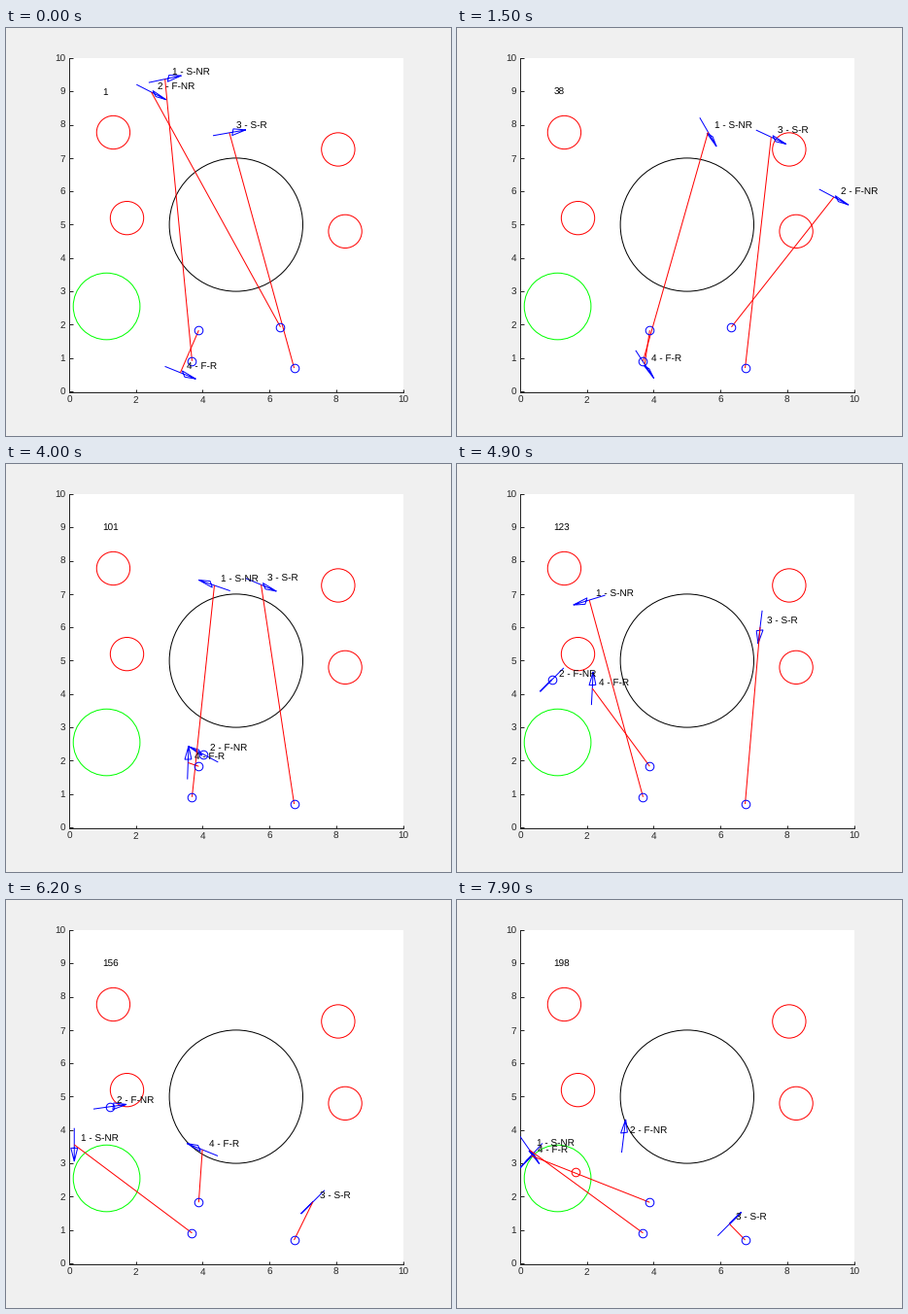
A matplotlib script for the animation above (8 s loop, 458 by 420 pixels).

```python
import numpy as np
import matplotlib.pyplot as plt
from matplotlib.animation import FuncAnimation

W, H, DPI = 458, 420, 100
FRAMES, INTERVAL = 80, 100
PX = 72 / DPI  # one pixel in points
GRAY = "#262626"
SLOW, FAST = 0.28, 0.45  # units per frame
plt.rcParams.update({"font.family": "Liberation Sans", "font.size": 10 * PX,
                     "text.hinting": "none"})

# Key poses (x, y, heading in degrees) that every robot passes at TIMES
TIMES = (0, 15, 27, 40, 49, 62, 79)
ROBOTS = {
    "1 - S-NR": (SLOW, [(2.87, 9.37, 12), (5.63, 7.78, -60), (5.02, 6.65, 175),
                        (4.35, 7.26, 161), (2.07, 6.82, 197),
                        (.15, 3.56, 270), (.28, 3.4, -55)]),
    "2 - F-NR": (FAST, [(2.46, 8.98, -27), (9.4, 5.83, -28), (8.79, 4.4, 225),
                        (4.02, 2.19, 152), (.95, 4.43, 225),
                        (1.22, 4.7, 8), (3.1, 3.82, 83)]),
    "3 - S-R": (SLOW, [(4.8, 7.76, 10), (7.52, 7.63, -25), (7.11, 7.55, 154),
                       (5.75, 7.28, -23), (7.19, 6.01, 263),
                       (7.3, 1.84, 225), (6.27, 1.18, 45)]),
    "4 - F-R": (FAST, [(3.33, .56, -22), (3.73, .81, -57), (4.86, .84, -57),
                       (3.56, 1.94, 88), (2.16, 4.17, 87),
                       (3.99, 3.41, 158), (.33, 3.23, 228)]),
}
ITEMS = [(3.68, .91), (6.33, 1.93), (6.74, .7), (3.88, 1.83)]
CARRIER, PICK, DROP = 1, 34, 71
DROP_POINT = (1.65, 2.74)


def unit(deg):
    a = np.radians(deg)
    return np.array([np.cos(a), np.sin(a)])


def make_path(speed, poses):
    """Join key poses with Hermite curves; spare travel becomes a loop."""
    keys = [(t, np.array(p[:2]), unit(p[2])) for t, p in zip(TIMES, poses)]

    def pose(i):
        k = next(k for k in range(1, len(keys)) if i <= keys[k][0])
        (t0, p, u), (t1, q, v) = keys[k - 1], keys[k]
        s = (i - t0) / (t1 - t0)
        m, n = speed * (t1 - t0) * u, speed * (t1 - t0) * v
        pos = ((2*s**3 - 3*s**2 + 1) * p + (s**3 - 2*s**2 + s) * m
               + (3*s**2 - 2*s**3) * q + (s**3 - s**2) * n)
        vel = (6*s*(s - 1) * (p - q) + (3*s**2 - 4*s + 1) * m
               + (3*s**2 - 2*s) * n)
        return pos, vel / np.hypot(*vel)

    def add(t, point, heading):
        keys.append((t, np.array(point), unit(heading)))
        keys.sort(key=lambda key: key[0])

    pose.add = add
    return pose


def arrow(pos, u):
    """Shaft and head; the head narrows towards the diagonals."""
    tail, tip = pos - u / 2, pos + u / 2
    side = 0.1 * u[::-1]
    base = tip - 0.4 * u
    return np.array([tail, tip, base + side, base - side, tip]).T


fig = plt.figure(figsize=(W / DPI, H / DPI), dpi=DPI, facecolor="#f0f0f0")
ax = fig.add_axes([65.1 / W, 46 / H, 343.4 / W, 343 / H])
ax.set(xlim=(0, 10), ylim=(0, 10), xticks=range(0, 11, 2), yticks=range(11))
ax.spines[["top", "right"]].set_visible(False)
ax.spines[["left", "bottom"]].set(linewidth=PX, color=GRAY)
ax.spines["bottom"].set_position(("outward", 0.7 * PX))
ax.tick_params(direction="in", length=3.5 * PX, width=PX, pad=4 * PX,
               color=GRAY, labelcolor=GRAY)


def ring(x, y, r, color):
    ax.add_patch(plt.Circle((x, y), r, fill=False, ec=color, lw=PX))


ring(5, 5, 2, "black")
ring(1.12, 2.55, 1, "lime")
for x, y in [(1.32, 7.77), (1.73, 5.2), (8.06, 7.26), (8.27, 4.8)]:
    ring(x, y, 0.5, "red")


def line(color, z):
    return ax.plot([], [], color=color, lw=PX, zorder=z,
                   solid_joinstyle="miter", solid_capstyle="butt")[0]


paths = [make_path(*robot) for robot in ROBOTS.values()]
paths[CARRIER].add(PICK, ITEMS[CARRIER], 205)
paths[CARRIER].add(DROP, DROP_POINT, 235)

arrows = [line("blue", 3) for _ in paths]
links = [line("red", 4) for _ in paths]
marks = [ax.plot(*p, "o", mfc="none", mec="blue", mew=PX, ms=8.6 * PX,
                 zorder=5, clip_on=False, snap=False)[0] for p in ITEMS]
labels = [ax.text(0, 0, name, zorder=6) for name in ROBOTS]
counter = ax.text(1, 8.9, "", zorder=6)


def update(i):
    counter.set_text(str(1 + int(2.5 * i)))
    for k, path in enumerate(paths):
        pos, u = path(i)
        arrows[k].set_data(*arrow(pos, u))
        labels[k].set_position(pos + (0.2, 0.1))
        item, color = ITEMS[k], "blue"
        linked = k != CARRIER or i < PICK
        if not linked:
            dropped = i >= DROP
            item = DROP_POINT if dropped else pos
            color = "red" if dropped else "blue"
        marks[k].set_data([item[0]], [item[1]])
        marks[k].set_markeredgecolor(color)
        links[k].set_data([pos[0], item[0]], [pos[1], item[1]])
        links[k].set_visible(linked)
    return arrows + links + marks + labels + [counter]


anim = FuncAnimation(fig, update, frames=FRAMES, interval=INTERVAL,
                     repeat=True, repeat_delay=0)
plt.show()
```
